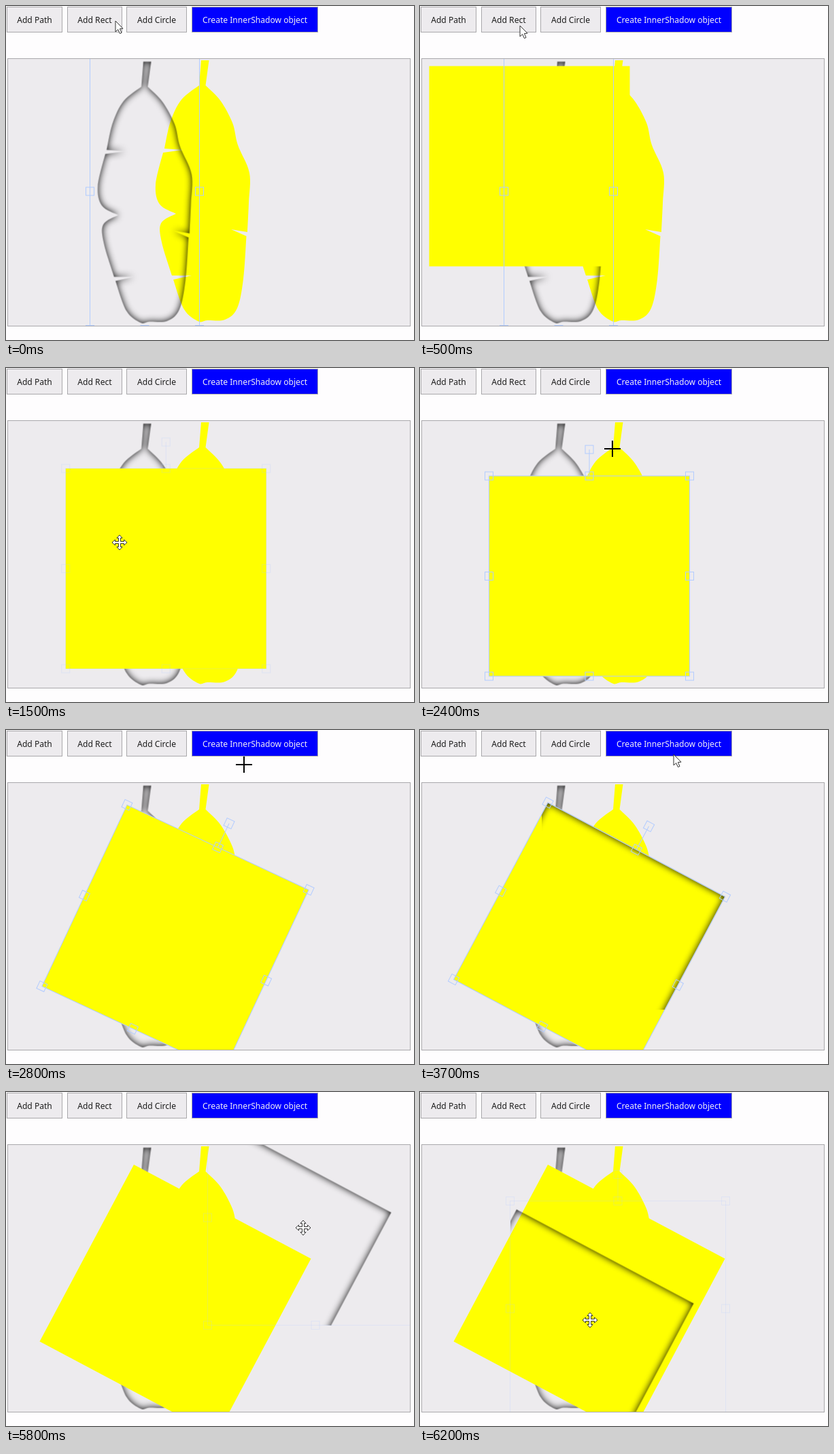
An HTML page with a canvas for the animation above (6300 ms loop, 600 px wide and 492 px high).

```html
<!DOCTYPE html>
<html lang="en">
<head>
<meta charset="utf-8">
<title>Inner shadow editor</title>
<style>
  html, body { margin: 0; width: 100%; height: 100%; overflow: hidden; background: #fefdfe; }
  canvas { display: block; }
</style>
</head>
<body>
<canvas id="stage" width="600" height="492"></canvas>
<script>
const ctx = document.getElementById('stage').getContext('2d');
const LOOP = 6300, STEP = 100;
const GRAY = '#edebee', EDGE = '#a9a8ab', YELLOW = '#ffff00', CONTROL = 'rgb(178,204,255)';
const BOARD = { x: 3, y: 78, w: 591, h: 393 };
const SIDE = 295, TILT = 28, FADED = 0.25;

const smooth = p => p * p * (3 - 2 * p);
const easeOut = p => 1 - (1 - p) ** 3;

// Position at time t after a chain of moves, resting between them.
function follow(pos, moves, t) {
  for (const { from, to, at, ease = smooth } of moves) {
    if (t <= from) break;
    const p = ease(Math.min(1, (t - from) / (to - from)));
    pos = pos.map((v, i) => v + (at[i] - v) * p);
  }
  return pos;
}

const squareMoves = [{ from: 1200, to: 1600, at: [249, 306.5] }];
const angleMoves = [{ from: 2400, to: 2900, at: [TILT] }];
const shadowMoves = [
  { from: 4300, to: 5000, at: [118, -68], ease: easeOut },
  { from: 5800, to: 6200, at: [-46, 66] }
];
const pointerMoves = [
  { from: 0, to: 300, at: [150, 19] },
  { from: 400, to: 1100, at: [93, 197] },
  { from: 1200, to: 1600, at: [181, 268] },
  { from: 1600, to: 1900, at: [247, 126] },
  { from: 2000, to: 2400, at: [283, 119] },
  { from: 2400, to: 3000, at: [373, 27] },
  { from: 3000, to: 3100, at: [372, 19] },
  { from: 3600, to: 3700, at: [373, 36] },
  { from: 3700, to: 4200, at: [318, 270] },
  { from: 4200, to: 4900, at: [437, 200], ease: easeOut },
  { from: 5800, to: 6200, at: [250, 336] }
];

// Smooth curve through points, with free ends.
function spline(path, pts) {
  path.lineTo(...pts[0]);
  for (let i = 0; i < pts.length - 1; i++) {
    const a = pts[Math.max(i - 1, 0)], b = pts[i], c = pts[i + 1];
    const d = pts[Math.min(i + 2, pts.length - 1)];
    path.bezierCurveTo(
      b[0] + (c[0] - a[0]) / 6, b[1] + (c[1] - a[1]) / 6,
      c[0] - (d[0] - b[0]) / 6, c[1] - (d[1] - b[1]) / 6, c[0], c[1]);
  }
}

function polygon(pts) {
  const p = new Path2D();
  pts.forEach(q => p.lineTo(...q));
  p.closePath();
  return p;
}

function makeLeaf() {
  const p = new Path2D();
  p.moveTo(287, 80);
  p.lineTo(298.5, 80);
  spline(p, [[293.5, 117], [315, 139], [333, 172], [341, 205], [358, 246], [357, 290], [355, 333]]);
  p.lineTo(331, 329);
  spline(p, [[353.5, 339], [349, 402], [340, 445], [322, 462], [296, 463], [283, 464.5], [262, 447], [246, 403]]);
  p.lineTo(273, 397);
  spline(p, [[244, 397], [229, 348], [228, 320], [250, 306]]);
  spline(p, [[250, 306], [226, 292], [220, 263], [231, 216]]);
  p.lineTo(260, 212);
  spline(p, [[233, 210], [242, 170], [258, 138], [284, 117]]);
  p.closePath();
  return p;
}

function shifted(path, x, y) {
  const p = new Path2D();
  p.addPath(path, new DOMMatrix().translate(x, y));
  return p;
}

function tiltedSquare(cx, cy, deg) {
  const a = deg * Math.PI / 180, c = Math.cos(a) * SIDE / 2, s = Math.sin(a) * SIDE / 2;
  return polygon([[cx - c + s, cy - s - c], [cx + c + s, cy + s - c],
    [cx + c - s, cy + s + c], [cx - c - s, cy - s + c]]);
}

// Sprite with the inner shadow of a path, cropped to a box.
function innerShadow(path, box) {
  const FAR = 2000;
  const sprite = document.createElement('canvas');
  sprite.width = box.w;
  sprite.height = box.h;
  const g = sprite.getContext('2d');
  g.translate(-box.x, -box.y);
  g.clip(path);
  g.shadowColor = '#000';
  g.shadowBlur = 11;
  g.shadowOffsetX = FAR;
  const caster = new Path2D();
  caster.rect(-300, -300, 1200, 1200);
  caster.addPath(path);
  g.translate(-FAR, 0);
  g.fill(caster, 'evenodd');
  return sprite;
}

const leaf = makeLeaf();
const leafBox = { x: 123.5, y: 69.5, w: 161, h: 407 };
const leafShadow = innerShadow(shifted(leaf, -85, 2), leafBox);
const cutBox = { x: 178.5, y: 94.5, w: 317, h: 317 };
const squareShadow = innerShadow(tiltedSquare(249, 306.5, TILT), cutBox);

function button(x, w, label, primary) {
  ctx.fillStyle = primary ? '#0000ff' : GRAY;
  ctx.fillRect(x, 1, w, 38);
  ctx.strokeStyle = EDGE;
  ctx.lineWidth = 1;
  ctx.strokeRect(x + 0.5, 1.5, w - 1, 37);
  ctx.fillStyle = primary ? '#f0eef4' : '#1c1c1c';
  ctx.font = '12.1px "Noto Sans", "Open Sans", sans-serif';
  ctx.textAlign = 'center';
  ctx.fillText(label, x + w / 2, 25);
}

// Selection frame with its handles, around a centre.
function controls(cx, cy, w, h, deg, alpha) {
  const ARM = 39, x = w / 2, y = h / 2;
  ctx.save();
  ctx.globalAlpha = alpha;
  ctx.strokeStyle = CONTROL;
  ctx.lineWidth = 1;
  ctx.translate(cx, cy);
  ctx.rotate(deg * Math.PI / 180);
  ctx.strokeRect(-x, -y, w, h);
  ctx.beginPath();
  ctx.moveTo(0, -y);
  ctx.lineTo(0, -y - ARM);
  ctx.stroke();
  const spot = (px, py) => ctx.strokeRect(px - 6, py - 6, 12, 12);
  for (const i of [-1, 0, 1])
    for (const j of [-1, 0, 1])
      if (i || j) spot(i * x, j * y);
  spot(0, -y - ARM);
  ctx.restore();
}

const boxControls = (box, dx, dy, alpha) =>
  controls(box.x + box.w / 2 + dx, box.y + box.h / 2 + dy, box.w, box.h, 0, alpha);

const arrow = polygon([[0, 0], [0, 16], [3.7, 12.6], [6.4, 18.6], [9, 17.5], [6.4, 11.6], [11, 11.2]]);
const arm = [[-1.5, -1.5], [-1.5, -6.5], [-4, -6.5], [0, -11], [4, -6.5], [1.5, -6.5]];
const arms = [];
for (let k = 0, c = 1, s = 0; k < 4; k++, [c, s] = [-s, c])
  arms.push(...arm.map(([x, y]) => [x * c - y * s, x * s + y * c]));
const fourWay = polygon(arms);

function pointer(t) {
  const [x, y] = follow([161, 22], pointerMoves, t);
  ctx.save();
  ctx.translate(Math.round(x), Math.round(y));
  if (t >= 1900 && t < 3100) {
    ctx.fillStyle = '#000';
    ctx.fillRect(-12, -1, 24, 2);
    ctx.fillRect(-1, -12, 2, 24);
  } else {
    const shape = y > BOARD.y ? fourWay : arrow;
    ctx.fillStyle = '#fff';
    ctx.strokeStyle = '#333';
    ctx.lineWidth = 1;
    ctx.fill(shape);
    ctx.stroke(shape);
  }
  ctx.restore();
}

function board(t) {
  ctx.save();
  ctx.fillStyle = GRAY;
  ctx.fillRect(BOARD.x, BOARD.y, BOARD.w, BOARD.h);
  ctx.beginPath();
  ctx.rect(BOARD.x, BOARD.y, BOARD.w, BOARD.h);
  ctx.clip();

  ctx.fillStyle = YELLOW;
  ctx.fill(leaf);
  ctx.drawImage(leafShadow, leafBox.x, leafBox.y);

  const [cx, cy] = follow([161, 236], squareMoves, t);
  const [deg] = follow([0], angleMoves, t);
  const [dx, dy] = follow([0, 0], shadowMoves, t).map(Math.round);
  if (t >= 500) {
    ctx.fillStyle = YELLOW;
    ctx.fill(tiltedSquare(cx, cy, deg));
  }
  if (t >= 3300) ctx.drawImage(squareShadow, cutBox.x + dx, cutBox.y + dy);

  // The selection passes from the leaf to the square, then to its shadow.
  if (t < 1200) boxControls(leafBox, 0, 0, 1);
  else if (t < 4400) controls(cx, cy, SIDE, SIDE, deg, t > 1200 && t < 1700 ? FADED : 1);
  else boxControls(cutBox, dx, dy, FADED);
  ctx.restore();

  ctx.strokeStyle = EDGE;
  ctx.lineWidth = 1;
  ctx.strokeRect(BOARD.x - 0.5, BOARD.y - 0.5, BOARD.w + 1, BOARD.h + 1);
}

function draw(t) {
  ctx.fillStyle = '#fefdfe';
  ctx.fillRect(0, 0, 600, 492);
  button(1, 82, 'Add Path');
  button(90, 81, 'Add Rect');
  button(177, 89, 'Add Circle');
  button(273, 186, 'Create InnerShadow object', true);
  board(t);
  pointer(t);
}

const start = performance.now();
function tick() {
  const t = (performance.now() - start) % LOOP;
  draw(Math.floor(t / STEP) * STEP);
  requestAnimationFrame(tick);
}
tick();
</script>
</body>
</html>
```
